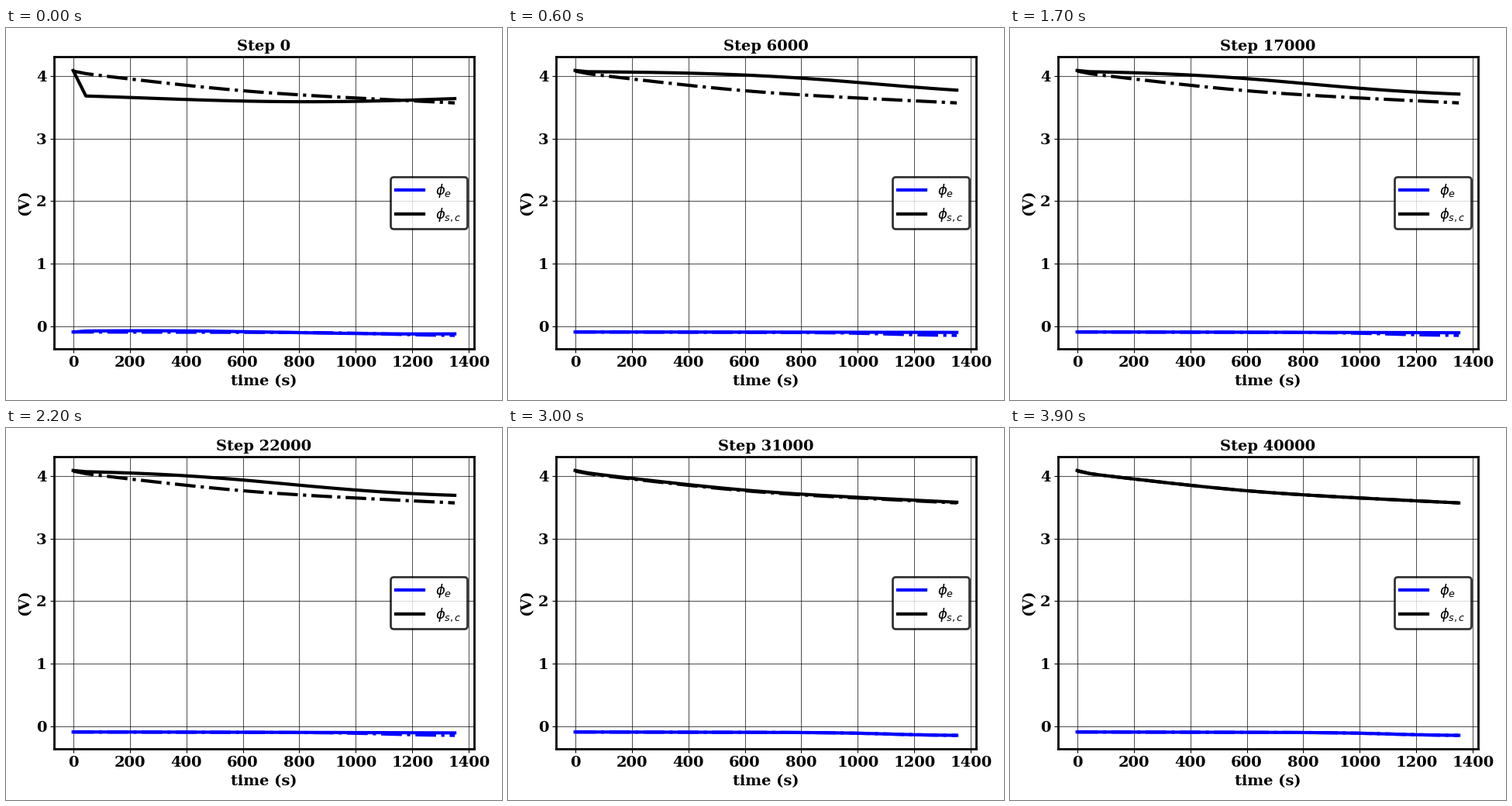
Recreate the animation shown at these times as a matplotlib script. Size 640 by 480 pixels, loop 4 s.

```python
import numpy as np
import matplotlib.pyplot as plt
from matplotlib.animation import FuncAnimation

plt.rcParams.update({
    "font.family": "DejaVu Serif",
    "axes.labelweight": "bold",
    "axes.titleweight": "bold",
    "axes.labelsize": 14,
    "axes.titlesize": 14,
    "xtick.labelsize": 14,
    "ytick.labelsize": 14,
    "axes.linewidth": 2,
    "lines.linewidth": 3,
})

FRAMES = 40
SWITCH = 30  # the optimiser changes here and one checkpoint is skipped
START_S, START_E = 4.087, -0.093

t = np.linspace(0, 1350, 31)
x = t / t[-1]


def logistic(z):
    return 1 / (1 + np.exp(-z))


def log_cosh(z):
    return np.log(np.cosh(z))


# Reference: a quick first drop, then a slope easing from steep to gentle
bend = 0.043 * (log_cosh((x - 0.45) / 0.2) - log_cosh(0.45 / 0.2))
true_s = 4.077 - 0.02 * (1 - np.exp(-x / 0.02)) - 0.51 * x + bend
true_e = START_E - 0.012 * x - 0.045 * logistic((x - 0.82) / 0.07)


def untrained():
    s = 3.648 - 0.061 * np.sin(3.613 * (x - 0.18))
    e = -0.0985 + 0.0255 * np.cos(np.pi * (x - 0.18) / 0.74)
    return s, e


def learning(k):
    """A sigmoid drop that moves left as training goes on."""
    centre = 1.10 - 0.175 * np.log(k)
    depth = 0.405 + 0.0001 * k ** 2
    sigmoid = logistic((x - centre) / 0.2)
    s = 4.067 - depth * (sigmoid - sigmoid[1])
    e = START_E - (0.0035 + 0.0005 * k) * x ** 1.5
    return s, e


def predict(k):
    """Predicted potentials after k thousand steps."""
    if k == 0:
        s, e = untrained()
    elif k < SWITCH:
        s, e = learning(k)
    else:
        s, e = true_s + 0.0012 * (FRAMES - k), true_e.copy()
    s[0], e[0] = START_S, START_E
    return s, e


fig, ax = plt.subplots(figsize=(6.4, 4.8), dpi=100)
line_e, = ax.plot(t, true_e, "b-", label=r"$\phi_e$")
ax.plot(t, true_e, "b-.")
line_s, = ax.plot(t, true_s, "k-", label=r"$\phi_{s,c}$")
ax.plot(t, true_s, "k-.")

ax.set_xlim(-67.5, 1417.5)
ax.set_ylim(-0.359, 4.303)
ax.set_xlabel("time (s)")
ax.set_ylabel("(V)")
title = ax.set_title("Step 0")
for label in ax.get_xticklabels() + ax.get_yticklabels():
    label.set_fontweight("bold")
ax.grid(color="k", linewidth=0.5)
legend = ax.legend(loc="center right", fontsize=13, edgecolor="k")
legend.get_frame().set_linewidth(2)
fig.tight_layout()


def draw(i):
    k = i if i < SWITCH else i + 1
    s, e = predict(k)
    line_s.set_ydata(s)
    line_e.set_ydata(e)
    title.set_text(f"Step {k * 1000}")
    return line_s, line_e, title


anim = FuncAnimation(fig, draw, frames=FRAMES, interval=100, repeat=True)
plt.show()
```
